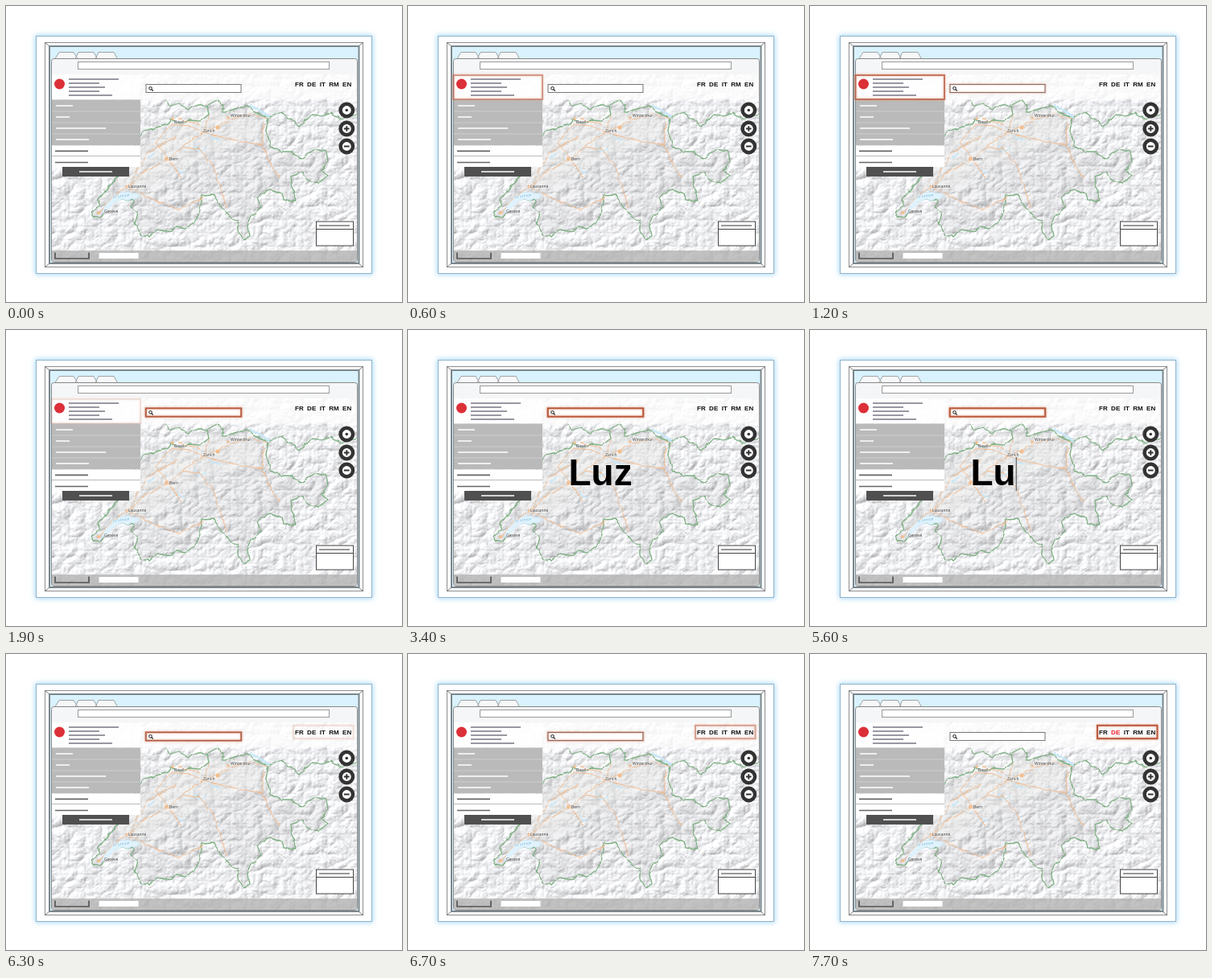
Write an HTML page that moves like this. It is 492 by 368 pixels and loops after 8000 ms.

```html
<!DOCTYPE html>
<html lang="en">
<head>
<meta charset="utf-8">
<title>Map viewer tour</title>
<style>
html, body { margin: 0; width: 100%; height: 100%; overflow: hidden; background: #fff; }
svg { position: absolute; left: 0; top: 0; }
path { fill: none; }
text { font-family: "Liberation Sans", Arial, sans-serif; white-space: pre; }
.place text { font: 4.9px "Noto Sans", sans-serif; fill: #333; stroke: #fff; stroke-width: .8; stroke-opacity: .7; paint-order: stroke; }
#overlay { will-change: transform; }
.glow { fill: none; stroke: #b9583c; stroke-width: 2; filter: blur(.6px) drop-shadow(0 0 1.5px #e9a488); }
</style>
</head>
<body>
<svg width="492" height="368" viewBox="0 0 492 368">
  <defs>
    <filter id="relief" x="0" y="0" width="1" height="1" color-interpolation-filters="sRGB">
      <feTurbulence type="turbulence" baseFrequency=".05 .06" numOctaves="4" seed="8"/>
      <feDiffuseLighting surfaceScale="1.7" diffuseConstant="1.1" lighting-color="#fafbff">
        <feDistantLight azimuth="225" elevation="57"/>
      </feDiffuseLighting>
    </filter>
    <filter id="wiggle" x="-.1" y="-.1" width="1.2" height="1.2">
      <feTurbulence type="fractalNoise" baseFrequency=".15" numOctaves="1" seed="3"/>
      <feDisplacementMap in="SourceGraphic" scale="5" xChannelSelector="R" yChannelSelector="G"/>
    </filter>
    <filter id="soft" x="-.3" y="-.3" width="1.6" height="1.6"><feGaussianBlur stdDeviation="7"/></filter>
    <filter id="halo" x="-.1" y="-.1" width="1.2" height="1.2"><feGaussianBlur stdDeviation="3"/></filter>
    <clipPath id="page"><rect x="57" y="85" width="379" height="233"/></clipPath>
  </defs>

  <!-- screen and browser -->
  <rect x="36" y="36" width="420" height="298" fill="#a9d8f5" filter="url(#halo)"/>
  <rect x="37.500" y="37.500" width="417" height="295" fill="#fff" stroke="#8fb4cc"/>
  <rect x="48.500" y="45.500" width="395" height="279" fill="#fff" stroke="#8c8c92"/>
  <path d="M48 45l6 5M444 45l-6 5M48 325l6-5M444 325l-6-5" stroke="#777"/>
  <rect x="54" y="50" width="384.500" height="270" fill="#d9f2fd" stroke="#7b868c" stroke-width="2"/>
  <path d="M111 65.500L115 57.500h19l4.500 8M86 65.500L90 57.500h19l4.500 8M61 65.500L66 57.500h18l5 8" style="fill:#f6f8fa" stroke="#999" stroke-width=".9"/>
  <rect x="56.500" y="65.500" width="380" height="253" rx="3" fill="#f5f6f8" stroke="#888"/>
  <rect x="89.500" y="69.500" width="312" height="9" fill="#fff" stroke="#999"/>

  <!-- map -->
  <g clip-path="url(#page)">
    <rect x="57" y="85" width="379" height="233" filter="url(#relief)"/>
    <rect x="57" y="85" width="379" height="233" fill="#fff" opacity=".28"/>
    <path d="M140 225L180 160 240 130 310 135 318 160 260 180 210 205 165 235z" style="fill:#fafaf7" opacity=".45" filter="url(#soft)"/>
    <g filter="url(#wiggle)" stroke-linejoin="round">
      <path d="M107 261L108 254 117 249 114 241 124 230 138 213 152 201 166 183 160 173 172 155 188 151 201 147 205 141 216 146 227 142 241 143 252 135 249 124 262 117 271 123 269 133 284 128 299 124 313 133 326 139 323 155 329 174 343 181 354 181 366 190 384 178 398 181 400 193 392 204 399 211 390 220 374 217 368 207 354 212 356 226 360 242 345 241 343 233 328 228 312 238 317 250 304 262 300 274 302 286 295 290 289 280 289 268 278 262 268 251 258 235 244 236 241 254 236 268 223 276 211 274 205 281 188 278 178 287 168 285 160 270 164 258 154 250 159 242 141 239 128 245 124 255 117 264z" style="fill:#5c565c;fill-opacity:.07" stroke="#80b085" stroke-width="1.400"/>
      <path d="M249 124H232L226 129 215 121 203 125 200 117M326 139L342 132 354 141 365 150 378 136 390 137 404 132 416 141 438 133" stroke="#80b085" stroke-width="1.300"/>
      <path d="M120 258Q124 240 138 233 152 228 167 236 160 243 144 240 132 243 124 257z" style="fill:#e0f2fc" stroke="#bfe1f4" stroke-width=".5"/>
      <path d="M303 124q14 5 24 15" stroke="#c9e8f8" stroke-width="2.600"/>
      <path d="M250 157q7 9 17 10M233 174l8 7 7-4M176 190l9-7M213 205l10 3" stroke="#c9e8f8" stroke-width="1.700"/>
      <path d="M117 257Q130 234 154 225L170 207 202 191 220 174 246 157 280 141 304 134 326 140M202 191L187 169 205 147 228 149 246 157 252 136M154 225L181 240 214 253 246 238M202 191L218 213M220 174L241 178 258 200 266 225 275 252M246 157L276 165 318 173 328 196 340 214M318 173L320 145M154 225L162 204 177 182 214 161M213 140L240 147" stroke="#f3b888" stroke-width=".9"/>
    </g>
    <g fill="#f3bd8c">
      <circle cx="115" cy="257" r="2"/><circle cx="150" cy="224" r="1.500"/><circle cx="199" cy="190" r="2"/><circle cx="263" cy="151" r="2.500"/><circle cx="276" cy="139" r="1.700"/><circle cx="207" cy="140" r="1.700"/>
    </g>
    <g class="place">
      <text x="209" y="146">Basel</text><text x="279" y="138">Winterthur</text>
      <text x="245" y="156.500">Zürich</text><text x="203" y="192">Bern</text>
      <text x="152" y="225.500">Lausanne</text><text x="122" y="257">Genève</text>
      <text transform="translate(133 239) rotate(-7)" style="fill:#62b4de;font-style:italic">Le Léman</text>
    </g>
    <rect x="57" y="85" width="379" height="31.500" fill="#fff" opacity=".8"/>
    <rect x="57" y="304" width="379" height="14" fill="#b4b4b4" opacity=".8"/>
  </g>

  <!-- header -->
  <rect x="57" y="86" width="110" height="30" fill="#fff" opacity=".75"/>
  <circle cx="66.500" cy="97" r="6.500" fill="#dc3038"/>
  <path d="M78 91h62M78 96h38M78 101h45M78 106h38M78 111h54" stroke="#777784" stroke-width="1.500"/>
  <rect x="174" y="97.500" width="118" height="10" fill="#fff" stroke="#777"/>
  <circle cx="179.500" cy="102.300" r="1.800" fill="#fff" stroke="#111"/>
  <path d="M180.800 103.600l2 2" stroke="#111" stroke-width="1.300"/>

  <!-- menu -->
  <rect x="57" y="116.500" width="110" height="57" fill="#bababa"/>
  <rect x="57" y="173.500" width="110" height="27" fill="#fff"/>
  <path d="M57 131h110M57 145h110M57 159h110" stroke="#cdcdcd"/>
  <path d="M57 186.500h110" stroke="#bbb"/>
  <path d="M62 124h21M62 138h17M62 152h62M62 166h41" stroke="#fff" stroke-width="1.700"/>
  <path d="M61 180.300h41M61 194.500h41" stroke="#666" stroke-width="1.700"/>
  <rect x="70" y="200" width="83" height="12" fill="#505050"/>
  <path d="M91 206h41" stroke="#fff" stroke-width="1.700"/>

  <!-- map controls -->
  <g fill="#fff" stroke="#333" stroke-width="4.500">
    <circle cx="423.300" cy="129.500" r="7.700"/><circle cx="423.300" cy="152.500" r="7.700"/><circle cx="423.300" cy="174.500" r="7.700"/>
  </g>
  <circle cx="423.300" cy="129.500" r="1.800" fill="#333"/>
  <path d="M420 152.500h6.600M423.300 149.200v6.600M420 174.500h6.600" stroke="#333" stroke-width="2"/>
  <rect x="385.500" y="268" width="46" height="30" fill="#fff" stroke="#444"/>
  <path d="M385 277.500h46" stroke="#444"/>
  <path d="M389 273h38" stroke="#777" stroke-width="1.700"/>
  <rect x="115.500" y="307" width="49" height="7" fill="#fff"/>
  <path d="M61 306.500v7.500h42v-7.500" stroke="#555" stroke-width="1.700"/>
</svg>

<svg id="overlay" width="492" height="368" viewBox="0 0 492 368">
  <rect class="glow" id="header" x="56.500" y="86" width="110.500" height="30"/>
  <rect class="glow" id="search" x="173.700" y="97.300" width="118.600" height="10.400"/>
  <rect class="glow" id="langs" x="357" y="88.800" width="74.500" height="16.400"/>
  <text x="359" y="99.500" font-size="8" font-weight="bold" fill="#111">FR  <tspan id="german">DE</tspan>  IT  RM  EN</text>
  <text id="typed" x="199.500" y="193" font-size="46" font-weight="bold"></text>
  <rect id="caret" y="158" width="1.200" height="42" fill="#666"/>
</svg>

<script>
const LOOP = 8000, STEP = 100, WORD = "Luzern", TYPE_START = 2200, TYPE_END = 6000;
const el = id => document.getElementById(id);
const [header, search, langs, german, typed, caret] =
  ["header", "search", "langs", "german", "typed", "caret"].map(el);
const ramp = (t, from, to) => Math.min(1, Math.max(0, (t - from) / (to - from)));

function drawTyping(t) {
  const active = t >= TYPE_START && t < TYPE_END;
  const beat = Math.floor((t - TYPE_START) / 200);
  // a letter every second beat, then one deletion per beat
  const count = !active ? 0 : beat < 13 ? beat >> 1 : 19 - beat;
  const caretOn = active && (beat >= 13 || (beat > 1 ? beat % 2 : beat === 0));
  typed.textContent = WORD.slice(0, count);
  caret.setAttribute("x", count ? 199.5 + typed.getComputedTextLength() : 195);
  caret.style.opacity = caretOn ? 1 : 0;
}

function draw(now) {
  const t = Math.floor(now % LOOP / STEP) * STEP;
  const swap = ramp(t, 6100, 7200);
  header.style.opacity = ramp(t, 0, 1000) - ramp(t, 1000, 2100);
  search.style.opacity = ramp(t, 900, 2000) - swap;
  langs.style.opacity = swap;
  german.style.fill = t >= 7700 ? "#f0202a" : "#111";
  drawTyping(t);
}

let start;
function tick(now) {
  start ??= now;
  draw(now - start);
  requestAnimationFrame(tick);
}
draw(0);
requestAnimationFrame(tick);
</script>
</body>
</html>
```
